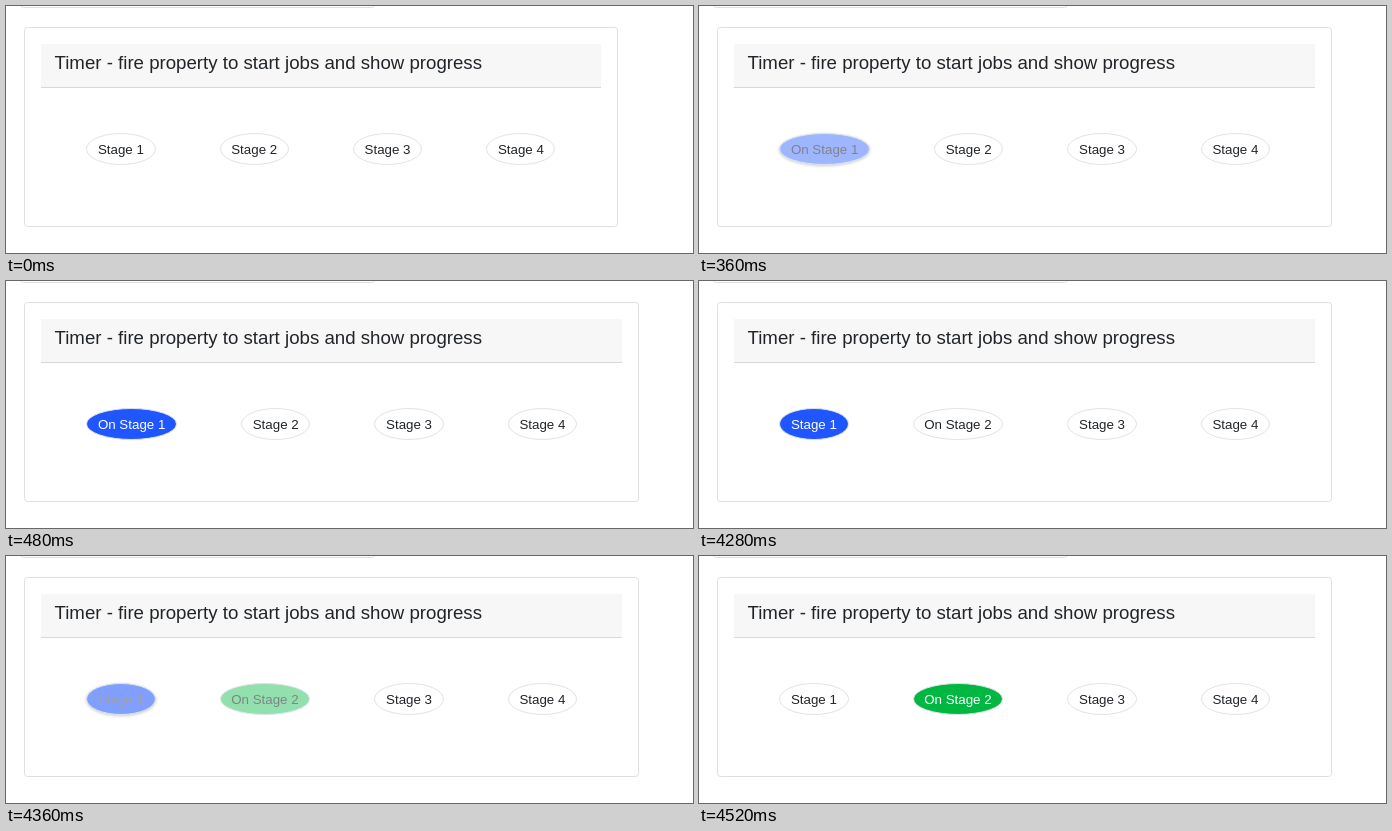
Recreate the animation shown at these times as an HTML page. Size 687 by 247 pixels, loop 8000 ms.

```html
<!DOCTYPE html>
<html lang="en">
<head>
<meta charset="utf-8">
<title>Timer</title>
<style>
  html, body { margin: 0; width: 100%; height: 100%; overflow: hidden; background: #fff; }
  svg { display: block; font-family: "Liberation Sans", Arial, sans-serif; }
  .card { fill: #fff; stroke: #dfdfdf; }
  .pill { stroke: #dee4e8; }
  .label { font-size: 13.333px; }
</style>
</head>
<body>
<svg id="stage" width="687" height="247" viewBox="0 0 687 247">
  <rect class="card" x="14.5" y="-40.5" width="354" height="42" rx="3"/>
  <rect id="card" class="card" x="18.5" y="21.5" height="199" rx="3"/>
  <rect id="header" x="35" y="38" height="43" fill="#f7f7f7"/>
  <rect id="rule" x="35" y="81" height="1" fill="#d8d8d8"/>
  <text x="48.5" y="63" font-size="18.667" fill="#212529">Timer - fire property to start jobs and show progress</text>
</svg>
<script>
const LOOP = 8000, STEP = 40;
const LEFT = 80.2, WIDTH = 69.3, PREFIX = 21.5, PITCH = 133.33, PAD = 11.7;
const WHITE = [255, 255, 255], INK = [33, 37, 41];
const BLUE = [32, 86, 255], GREEN = [0, 184, 65];

const svg = document.getElementById("stage");
const byId = id => document.getElementById(id);

function add(tag, attrs) {
  const node = document.createElementNS(svg.namespaceURI, tag);
  set(node, attrs);
  return svg.appendChild(node);
}

function set(node, attrs) {
  for (const key in attrs) node.setAttribute(key, attrs[key]);
}

const stages = [1, 2, 3, 4].map(number => ({
  number,
  pill: add("ellipse", { class: "pill", cy: 143, ry: 15.5 }),
  label: add("text", { class: "label", y: 148 })
}));

const mix = (a, b, p) =>
  `rgb(${a.map((v, i) => Math.round(Math.min(255, Math.max(0, v + (b[i] - v) * p))))})`;

function bezier(x1, y1, x2, y2) {
  const curve = (a, b, u) => 3 * a * u * (1 - u) ** 2 + 3 * b * u * u * (1 - u) + u ** 3;
  return x => {
    let low = 0, high = 1;
    for (let i = 0; i < 24; i++) {
      const mid = (low + high) / 2;
      if (curve(x1, x2, mid) < x) low = mid; else high = mid;
    }
    return curve(y1, y2, low);
  };
}
const ease = bezier(0.27, 0.01, 0.38, 1.06);

// Stepped 250 ms transition; it rests after `hold` ms and completes at `end` ms.
function fade(elapsed, hold, end) {
  if (elapsed < STEP) return 0;
  if (elapsed >= end) return 1;
  return ease(Math.min(Math.floor(elapsed / STEP) * STEP, hold) / 250);
}

function draw(t) {
  const active = t < 280 ? 0 : t < 4280 ? 1 : 2;
  const first = fade(t - 280, 160, 200);
  const second = fade(t - 4280, 120, 240);
  const blue = first * (1 - second);
  const levels = [blue, second, 0, 0];
  const tints = [BLUE, GREEN, WHITE, WHITE];

  const growth = active ? 21 : 0;
  set(byId("card"), { width: 593 + growth });
  set(byId("header"), { width: 560 + growth });
  set(byId("rule"), { width: 560 + growth });

  let x = LEFT;
  stages.forEach(({ number, pill, label }, i) => {
    const extra = number === active ? PREFIX : 0;
    const left = Math.round(x), right = Math.round(x + WIDTH + extra);
    set(pill, {
      cx: (left + right) / 2,
      rx: (right - left - 1) / 2,
      fill: mix(WHITE, tints[i], levels[i])
    });
    set(label, { x: x + PAD, fill: mix(INK, WHITE, levels[i]) });
    label.textContent = (extra ? "On " : "") + "Stage " + number;
    x += PITCH + extra;
  });

  const shade = blue * (1 - blue);
  stages[0].pill.style.filter = shade > 0.001
    ? `drop-shadow(0 1.5px 1.5px rgba(40, 50, 80, ${shade}))` : "none";
}

function tick() {
  draw(performance.now() % LOOP);
  requestAnimationFrame(tick);
}
tick();
</script>
</body>
</html>
```
